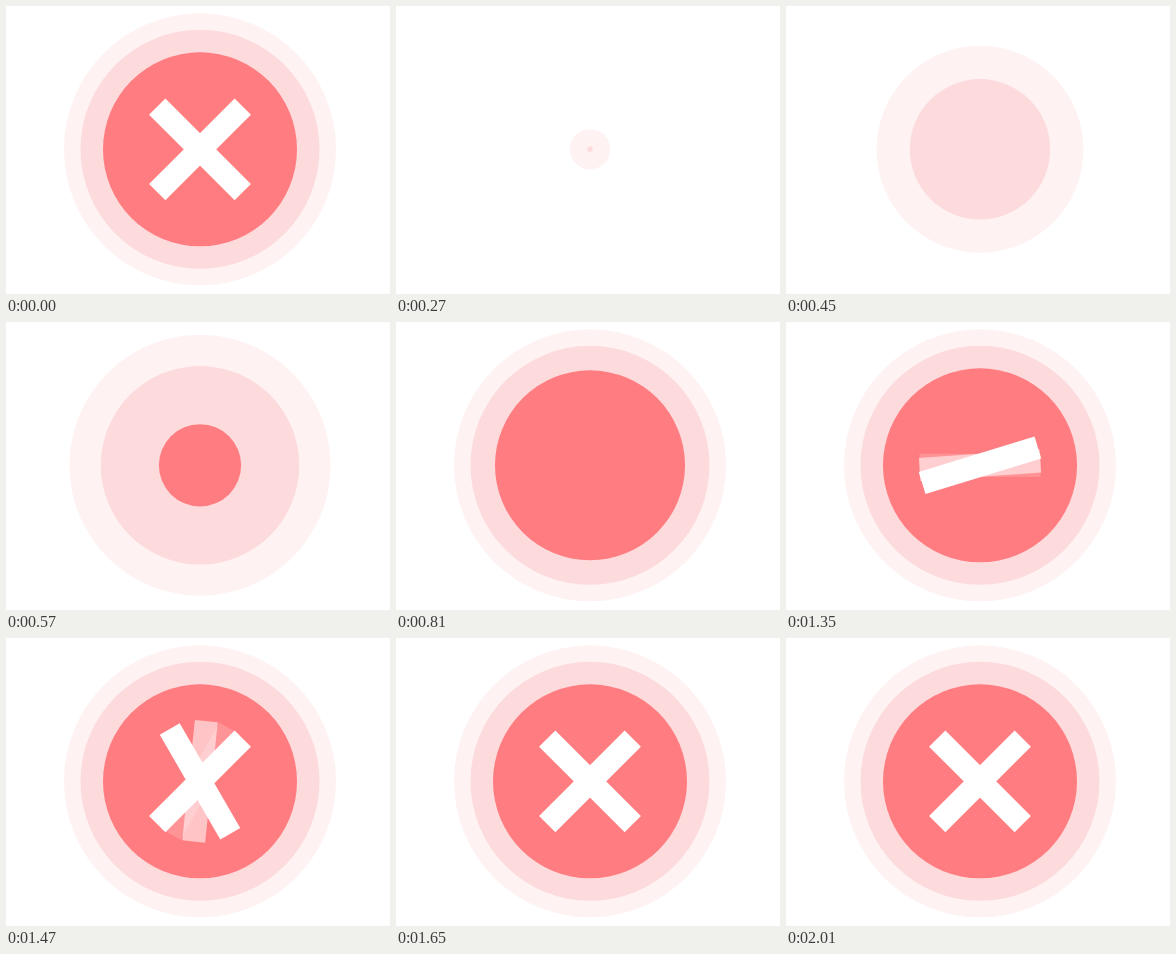
Recreate the animation shown at these times as an HTML page with a canvas. Size 384x288 px, loop 2.25 s.

```html
<!DOCTYPE html>
<html lang="en">
<head>
<meta charset="utf-8">
<title>Error badge</title>
<style>
html, body { margin: 0; width: 100%; height: 100%; overflow: hidden; background: #fff; }
canvas { display: block; width: 384px; height: 288px; }
</style>
</head>
<body>
<canvas id="stage" width="384" height="288"></canvas>
<script>
const ctx = document.getElementById('stage').getContext('2d');
const LOOP = 2250, STEP = 30;
const CX = 194, CY = 143.3;
const BAR_LENGTH = 121, BAR_WIDTH = 23;

// Each disc pops open with its own delay
const discs = [
  { color: '#fef2f2', radius: 136, start: 238, length: 415 },
  { color: '#fddbdd', radius: 119.5, start: 264, length: 520 },
  { color: '#ff7c80', radius: 97, start: 476, length: 390 }
];

// [time, degrees] of the leading bar
const turn = [
  [1290, 0], [1320, 4], [1350, 17], [1380, 38], [1410, 61],
  [1440, 84], [1470, 120], [1500, 132], [1530, 135]
];

const easeOut = x => {
  const p = Math.min(1, Math.max(0, x));
  return 1 - (1 - p) ** 2;
};

function angleAt(t) {
  if (t <= turn[0][0]) return 0;
  for (let i = 1; i < turn.length; i++) {
    const [t0, a0] = turn[i - 1], [t1, a1] = turn[i];
    if (t <= t1) return a0 + (a1 - a0) * (t - t0) / (t1 - t0);
  }
  return 135;
}

function disc(r, color) {
  if (r <= 0) return;
  ctx.fillStyle = color;
  ctx.beginPath();
  ctx.arc(CX, CY, r, 0, Math.PI * 2);
  ctx.fill();
}

function bar(length, degrees, alpha = 1) {
  ctx.save();
  ctx.translate(CX, CY);
  ctx.rotate(-degrees * Math.PI / 180);
  ctx.globalAlpha = alpha;
  ctx.fillStyle = '#fff';
  ctx.fillRect(-length / 2, -BAR_WIDTH / 2, length, BAR_WIDTH);
  ctx.restore();
}

function draw(time) {
  let t = Math.floor((time % LOOP) / STEP) * STEP;
  if (t < 120) t = LOOP;

  ctx.fillStyle = '#fff';
  ctx.fillRect(0, 0, 384, 288);
  for (const d of discs) disc(d.radius * easeOut((t - d.start) / d.length), d.color);

  const length = BAR_LENGTH * easeOut((t - 1020) / 297);
  if (length <= 0) return;
  const angle = angleAt(t);
  // Fading echoes trail the leading bar
  for (const [lag, alpha] of [[60, 0.18], [30, 0.55]]) {
    const past = angleAt(t - lag);
    if (past !== angle) bar(length, past, alpha);
  }
  bar(length, angle);
  if (angle > 45) bar(length, 45);
}

const origin = performance.now();
function tick() {
  draw(performance.now() - origin);
  requestAnimationFrame(tick);
}
tick();
</script>
</body>
</html>
```
